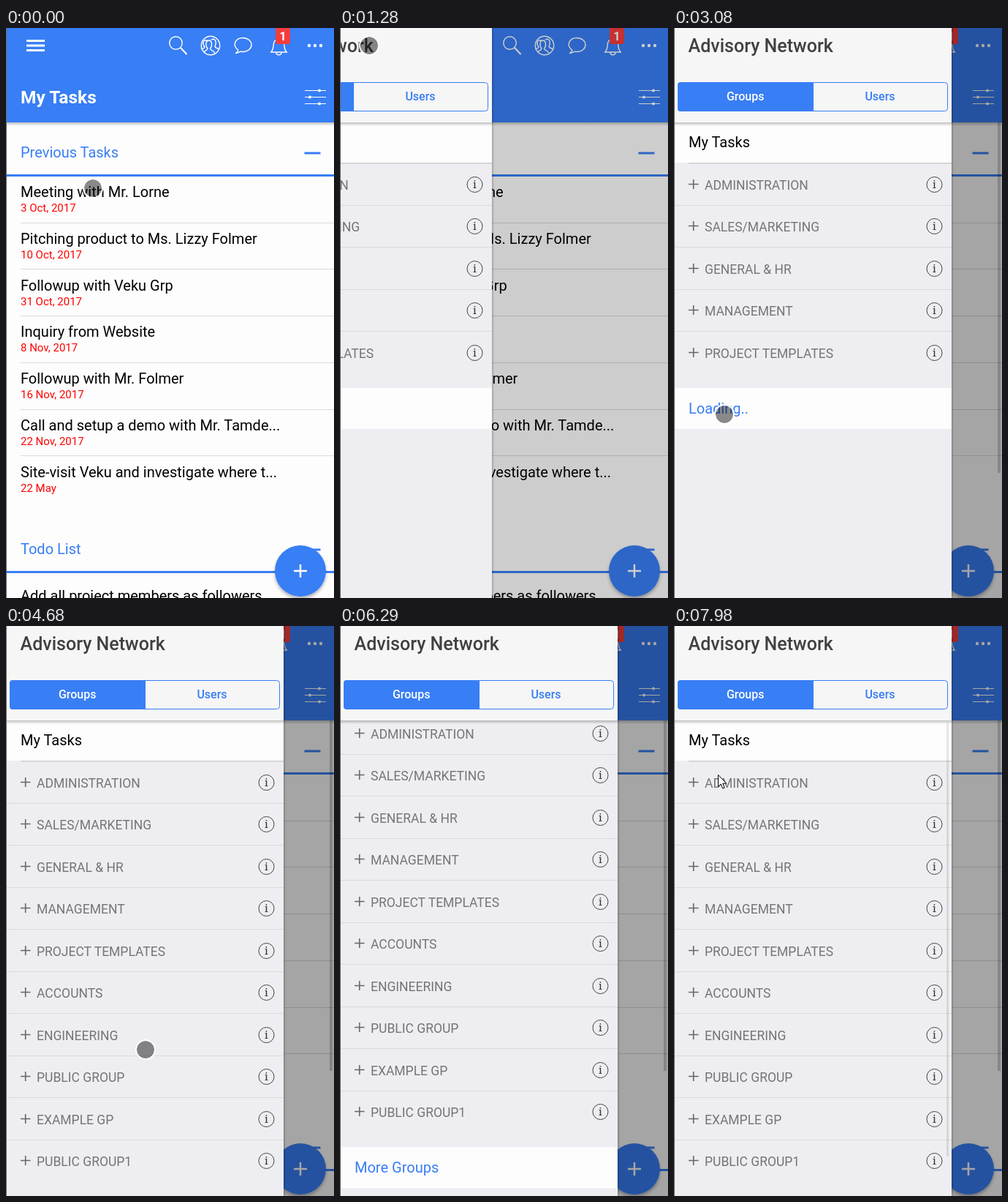
An HTML page that plays this animation: 449x779 px, repeating every 8 s.

```html
<!DOCTYPE html>
<html lang="en">
<head>
<meta charset="utf-8">
<title>Task list and group drawer</title>
<style>
  html, body { margin: 0; width: 100%; height: 100%; overflow: hidden; background: #fdfdfd; }
  svg { display: block; font-family: Roboto, sans-serif; }
  .icon { fill: none; stroke: #fff; stroke-width: 1.4; stroke-linecap: round; stroke-linejoin: round; }
</style>
</head>
<body>
<svg id="stage" width="449" height="779" viewBox="0 0 449 779"></svg>
<script>
const BLUE = '#387ef5', LOOP = 8000, STEP = 140, DRAWER_WIDTH = 380, ROW = 57.45, SCROLL = 67;

const rect = (x, y, w, h, fill, extra = '') =>
  `<rect x="${x}" y="${y}" width="${w}" height="${h}" fill="${fill}" ${extra}/>`;
const text = (x, y, size, fill, label, extra = '') =>
  `<text x="${x}" y="${y}" font-size="${size}" fill="${fill}" ${extra}>${label}</text>`;
const circle = (x, y, r, extra = '') => `<circle cx="${x}" cy="${y}" r="${r}" ${extra}/>`;
const path = (d, extra = '') => `<path d="${d}" ${extra}/>`;

const tasks = [
  ['Meeting with Mr. Lorne', '3 Oct, 2017'],
  ['Pitching product to Ms. Lizzy Folmer', '10 Oct, 2017'],
  ['Followup with Veku Grp', '31 Oct, 2017'],
  ['Inquiry from Website', '8 Nov, 2017'],
  ['Followup with Mr. Folmer', '16 Nov, 2017'],
  ['Call and setup a demo with Mr. Tamde...', '22 Nov, 2017'],
  ['Site-visit Veku and investigate where t...', '22 May'],
];
const groups = ['ADMINISTRATION', 'SALES/MARKETING', 'GENERAL &amp; HR', 'MANAGEMENT', 'PROJECT TEMPLATES',
  'ACCOUNTS', 'ENGINEERING', 'PUBLIC GROUP', 'EXAMPLE GP', 'PUBLIC GROUP1'];

const section = (y, label) =>
  text(20, y + 7, 20, BLUE, label) + rect(408.5, y - .5, 22, 3, BLUE) + rect(0, y + 30, 449, 3, BLUE);

const taskRow = ([title, date], i) => {
  const y = 63.75 * i;
  return text(20, 231 + y, 20, '#000', title) + text(20, 251 + y, 15, '#f00', date) +
    (i < tasks.length - 1 ? rect(20, Math.floor(266 + y), 429, 1, '#dadada') : '');
};

const topIcons = `
  <g class="icon">
    ${path('M28 17.5h25M28 24h25M28 30.5h25', 'stroke-width="3" stroke-linecap="butt"')}
    ${circle(232.5, 20.5, 8.7)}${path('M239 27l8 8.5', 'stroke-width="2"')}
    ${circle(280, 24, 12.7)}
    ${path('M271 33c1-3 5-2 5-5c-3-3-3-11 1.5-11c5 0 5 8 2 11c0 3 5 2 6 6M281 16c5-3 8 3 5 9c0 3 4 2 5 4M275 17c-6-2-6 6-3 9c0 2-3 2-4 3')}
    ${path('M314.5 34.5c2-1 3-2.5 3.2-4.5c-9-7-3-16.500 6.300-16.500c7 0 12 4.300 12 9.500s-5 9.500-12 9.500l-3-.3c-1.500 1-3.500 2-6.500 2.300z')}
    ${path('M362.5 33c4-3 3-7 4-12c1-7 13-7 14 0c1 5 0 9 4 12zM370 34.5c1 3 6 3 7 0')}
    ${path('M409 85.5h29M409 94.5h29M409 103.5h29', 'stroke-width="1" stroke-linecap="butt"')}
  </g>
  <g fill="#fff">
    ${[415, 423, 431].map(x => circle(x, 24, 2.2)).join('')}
    ${circle(429, 85.5, 2)}${circle(416, 94.5, 2)}${circle(429, 103.5, 2)}
  </g>
  ${rect(369, -4, 20, 26, '#f53d3d', 'rx="3"')}
  ${text(379, 16.5, 16.5, '#fff', '1', 'font-weight="700" text-anchor="middle"')}`;

const page = rect(0, 0, 449, 779, '#fdfdfd') +
  section(170, 'Previous Tasks') + tasks.map(taskRow).join('') +
  section(712, 'Todo List') + text(20, 783, 20, '#000', 'Add all project members as followers') +
  rect(0, 129, 449, 5, 'url(#shade)') + rect(0, 0, 449, 129, BLUE) + topIcons +
  text(20, 103, 24.5, '#fff', 'My Tasks', 'font-weight="700"') +
  circle(403, 742, 35, `fill="${BLUE}" filter="url(#lift)"`) +
  path('M394 742h18M403 733v18', 'stroke="#fff" stroke-width="2.5"') +
  rect(443, 129, 4, 479, '#000', 'id="pageBar" fill-opacity=".19"');

const groupRow = (name, i) => {
  const y = Math.round(214 + ROW * i);
  return `<g ${i > 4 ? 'class="extra"' : ''}>
    ${i ? rect(0, Math.floor(185 + ROW * i), 380, 1, '#dadadd') : ''}
    ${path(`M20 ${y - .5}h13.5M26.7 ${y - 7}v13`, 'stroke="#666" stroke-width="1.6"')}
    ${text(42, y + 6.5, 17.5, '#757575', name)}
    ${circle(356.5, y, 10.5, 'fill="none" stroke="#444"')}
    ${text(356.5, y + 5, 15, '#333', 'i', 'font-family="Noto Serif, serif" text-anchor="middle"')}
  </g>`;
};

const drawer = rect(0, 0, 380, 779, '#eeeef2', 'filter="url(#edge)"') +
  `<g id="list">
    ${rect(0, 129, 380, 55, '#fdfdfd')}${text(20, 163, 20, '#000', 'My Tasks')}
    ${rect(20, 184, 360, 1.5, '#cdcdd2')}
    ${groups.map(groupRow).join('')}
    <g id="more">${rect(0, 492, 380, 56, '#fdfdfd')}${text(20, 527, 20, BLUE, 'More Groups', 'id="moreLabel"')}</g>
  </g>` +
  rect(373, 132, 3, 593, '#000', 'id="listBar"') +
  rect(0, 129, 380, 5, 'url(#shade)') + rect(0, 0, 380, 129, '#f6f6f6') +
  text(19.5, 33, 25, '#404040', 'Advisory Network', 'font-weight="500"') +
  rect(5.5, 74.5, 369, 39, '#f6f6f6', `rx="4" stroke="${BLUE}"`) +
  path('M191 74v40H9a4 4 0 0 1-4-4V78a4 4 0 0 1 4-4z', `fill="${BLUE}"`) +
  text(97.7, 99, 16, '#fff', 'Groups', 'font-weight="500" text-anchor="middle"') +
  text(282, 99, 16, BLUE, 'Users', 'font-weight="500" text-anchor="middle"');

const stage = document.getElementById('stage');
stage.innerHTML = `
  <defs>
    <linearGradient id="shade" x2="0" y2="1">
      <stop stop-opacity=".24"/><stop offset="1" stop-opacity="0"/>
    </linearGradient>
    <filter id="lift" x="-20%" y="-20%" width="140%" height="150%">
      <feDropShadow dx="0" dy="3" stdDeviation="2" flood-opacity=".3"/>
    </filter>
    <filter id="edge" x="-5%" y="-5%" width="110%" height="110%">
      <feDropShadow dx="1" dy="0" stdDeviation="1.5" flood-opacity=".3"/>
    </filter>
  </defs>
  ${page}
  ${rect(0, 0, 449, 779, '#000', 'id="dim"')}
  <g id="drawer">${drawer}</g>
  ${rect(0, 0, 1, 779, '#6e6e6e')}
  <g id="touch">
    ${circle(0, 0, 12, 'fill="#000" fill-opacity=".46"')}
    ${circle(0, 0, 13, 'fill="none" stroke="#fff" stroke-opacity=".9" stroke-width="2"')}
  </g>
  ${path('M.5.5v16l3.7-3.5l2.5 6l2.5-1l-2.5-5.8h5z', 'id="arrow" fill="#fff" stroke="#000"')}`;

const el = {};
for (const node of stage.querySelectorAll('[id]')) el[node.id] = node;
const extras = stage.querySelectorAll('.extra');

const linear = u => u;
const smooth = u => u * u * (3 - 2 * u);
const easeOut = u => u * (2 - u);
const fling = u => u ** 6;
const progress = (t, start, span, ease = linear) => ease(Math.min(1, Math.max(0, (t - start) / span)));

// Point on a Bezier curve with any number of control points.
function bezier(points, u) {
  while (points.length > 1) {
    points = points.slice(1).map(([x, y], i) => [
      points[i][0] + (x - points[i][0]) * u,
      points[i][1] + (y - points[i][1]) * u,
    ]);
  }
  return points[0];
}

// Each glide follows its curve, then rests at the end until the next one starts.
const touchGlides = [
  { start: 140, span: 700, ease: easeOut, points: [[119, 219], [185, 87], [40, 24]] },
  { start: 1820, span: 840, ease: smooth, points: [[40, 24], [331, 440], [48, 597], [69, 528]] },
  { start: 3080, span: 360, ease: smooth, points: [[69, 528], [169, 678]] },
  { start: 4200, span: 420, ease: smooth, points: [[169, 678], [191, 579]] },
  { start: 4620, span: 560, ease: smooth, points: [[191, 579], [174, 480]] },
  { start: 5320, span: 420, ease: smooth, points: [[174, 480], [363, 536]] },
  { start: 5740, span: 560, ease: linear, points: [[363, 536], [533, 642], [362, 788], [385, 775]] },
];
const arrowGlide = { start: 7140, span: 840, ease: easeOut, points: [[376, 706], [196, 256], [384, 471], [60, 203]] };

const along = (glide, t) => bezier(glide.points, progress(t, glide.start, glide.span, glide.ease));
const barFlash = (t, from, hold) => t < from ? 0 : 1 - progress(t, from + hold, 420);
const move = (node, x, y) => node.setAttribute('transform', `translate(${x} ${y})`);
const show = (node, visible) => node.setAttribute('visibility', visible ? 'visible' : 'hidden');

function draw(time) {
  // The screen refreshes in coarse steps.
  const t = STEP * Math.floor((time + 20) / STEP);
  const open = progress(t, 1148, 343, easeOut);
  const scroll = SCROLL * (progress(t, 4620, 560, fling) - progress(t, 7280, 280, easeOut));
  const loaded = time >= 3870;

  move(el.drawer, Math.round(DRAWER_WIDTH * (open - 1)) - (open ? 0 : 20), 0);
  el.dim.setAttribute('opacity', .35 * open);
  show(el.pageBar, t >= 1400);

  move(el.list, 0, -scroll);
  move(el.more, 0, loaded ? 5 * ROW : 0);
  show(el.more, !loaded || t >= 5180);
  el.moreLabel.textContent = t >= 3080 && !loaded ? 'Loading..' : 'More Groups';
  extras.forEach(row => show(row, loaded));

  const bar = t < 5040 ? barFlash(t, 3780, 420) : t < 7420 ? barFlash(t, 5040, 280) : barFlash(t, 7420, 400);
  move(el.listBar, 0, scroll * .91);
  el.listBar.setAttribute('opacity', loaded ? .15 * bar : 0);

  move(el.touch, ...along(touchGlides.findLast(g => g.start <= t) ?? touchGlides[0], t));
  show(el.touch, t < 6300);
  move(el.arrow, ...along(arrowGlide, t));
  show(el.arrow, t >= arrowGlide.start);
}

const start = performance.now();
function tick() {
  draw((performance.now() - start) % LOOP);
  requestAnimationFrame(tick);
}
tick();
</script>
</body>
</html>
```
